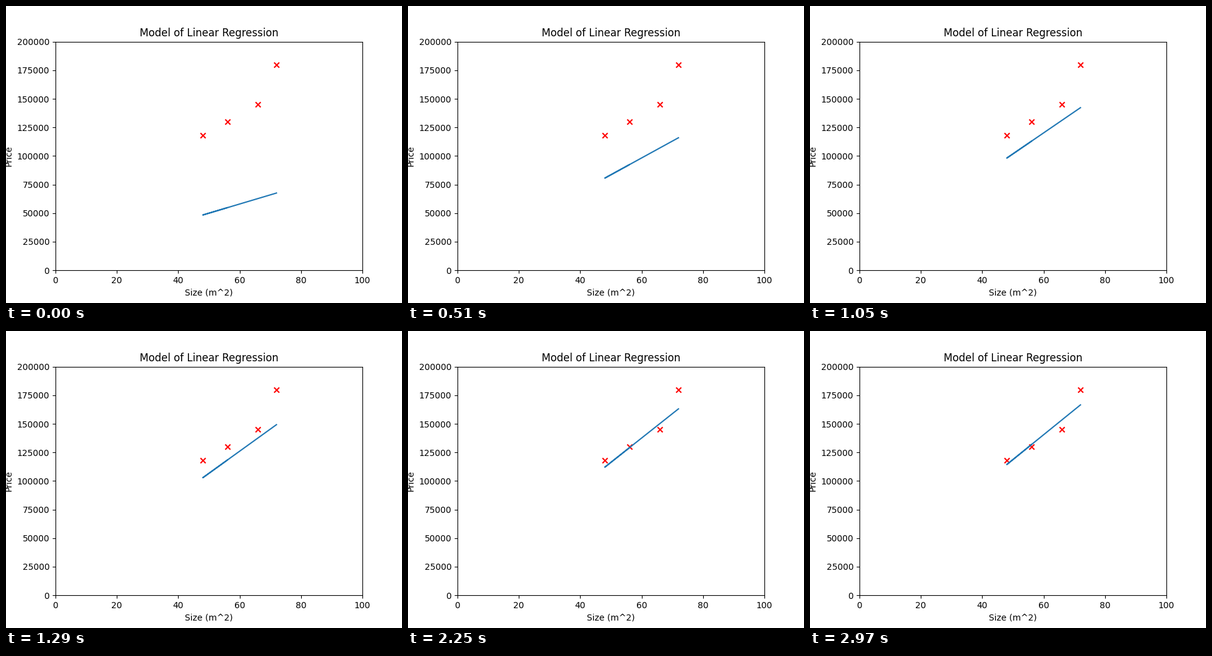
A matplotlib script for the animation above (3 s loop, 640 px wide and 480 px high).

```python
import numpy as np
import matplotlib.pyplot as plt
from matplotlib.animation import FuncAnimation

FRAMES = 100
INTERVAL = 30
RATE = 1e-5

sizes = np.array([56, 48, 66, 72])
prices = np.array([130000, 118000, 145000, 180000])


def descend(w=800.0, b=10000.0):
    """Return the (slope, intercept) pair after each gradient step."""
    steps = []
    for _ in range(FRAMES):
        steps.append((w, b))
        error = w * sizes + b - prices
        w -= RATE * np.mean(error * sizes)
        b -= RATE * np.mean(error)
    return steps


steps = descend()

fig, ax = plt.subplots(figsize=(6.4, 4.8), dpi=100)
ax.set_title("Model of Linear Regression")
ax.set_xlabel("Size (m^2)")
ax.set_ylabel("Price")
ax.set_xlim(0, 100)
ax.set_ylim(0, 200000)
ax.scatter(sizes, prices, color="red", marker="x")
line, = ax.plot([], [], color="tab:blue")


def update(i):
    w, b = steps[i]
    line.set_data(sizes, w * sizes + b)
    return line,


anim = FuncAnimation(fig, update, frames=FRAMES, interval=INTERVAL,
                     repeat=True, repeat_delay=0)
plt.show()
```
